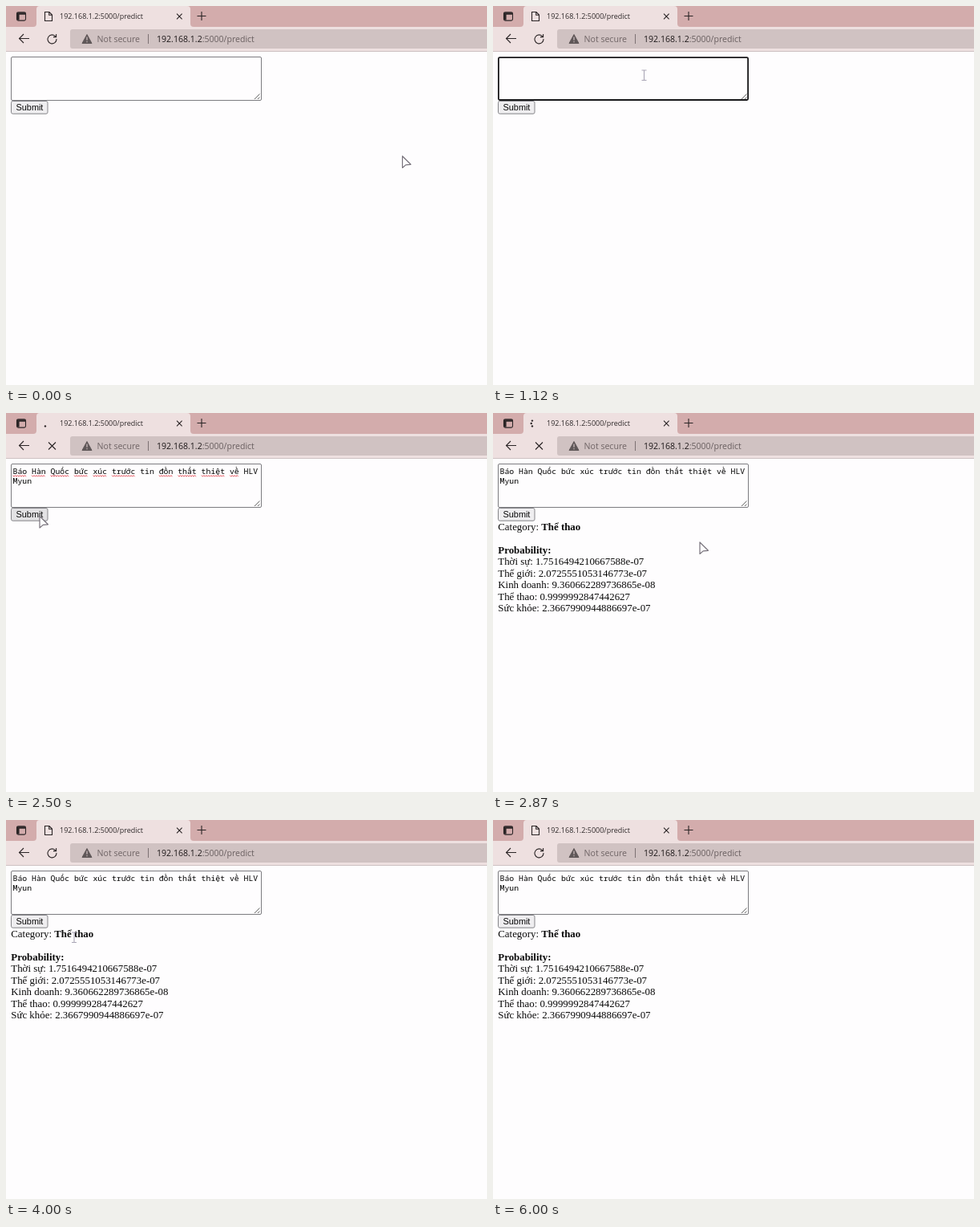
Recreate the animation shown at these times as an HTML page. Size 600 px wide and 472 px high, loop 8000 ms.

```html
<!DOCTYPE html>
<html lang="vi">
<head>
<meta charset="utf-8">
<style>
html, body { margin: 0; width: 100%; height: 100%; overflow: hidden; background: #fefdfe; }
svg { display: block; }
text { white-space: pre; }
.ui { font-family: "Open Sans", "Noto Sans", sans-serif; }
.mono { font: 500 9.8px "Noto Sans Mono", "DejaVu Sans Mono", monospace; fill: #000; }
.serif { font: 12.87px "Liberation Serif", "Times New Roman", serif; fill: #0a0a0a; }
.line { fill: none; stroke: #2b2526; stroke-width: 1.1; }
.bold { font-weight: bold; }
</style>
</head>
<body>
<svg width="600" height="472" viewBox="0 0 600 472">
  <!-- tab strip and toolbar -->
  <rect width="600" height="27" fill="#d3acac"/>
  <rect y="26" width="600" height="30" fill="#eee0e0"/>
  <path d="M34 26Q38 26 38 22V4Q38 0 42 0H226Q230 0 230 4V22Q230 26 234 26Z" fill="#eee0e0"/>
  <rect y="56" width="600" height="1" fill="#cdc1c2"/>
  <rect x="80" y="29" width="530" height="24" rx="3" fill="#d0c2c2"/>

  <rect class="line" x="13.5" y="7.9" width="11" height="10.2" rx="1.8"/>
  <path d="M13.5 8.2H24.5V10.7H16.6V17.5H14Z" fill="#2b2526"/>
  <path class="line" d="M213 9.7L219.6 16.3M219.6 9.7L213 16.3M238.5 12.5H249.5M244 7V18"/>
  <path class="line" d="M29 40.5H16.5M22 35L16.5 40.5L22 46"/>
  <g id="idle" class="line">
    <path d="M48.5 7.5H54L57.5 11V18.5H48.5ZM53.7 7.5V11.3H57.5"/>
    <path d="M62 38.2A5.5 5.5 0 1 0 63 41M62.6 35V38.6H59"/>
  </g>
  <g id="busy">
    <path class="line" d="M53 36.5L62 45.5M62 36.5L53 45.5"/>
    <g id="dots" fill="#2b2526"></g>
  </g>
  <path d="M101 35.5L107 46.5H95Z" fill="#5f5758" stroke="#5f5758" stroke-linejoin="round"/>
  <path d="M101 38.5V42.7M101 44V45.3" stroke="#d0c2c2" stroke-width="1.2"/>
  <path d="M177.5 35V47" stroke="#7d7273"/>
  <g class="ui">
    <text x="67" y="16.2" font-size="9" fill="#2f292a">192.168.1.2:5000/predict</text>
    <text x="113.5" y="45" font-size="10.6" fill="#6f6465">Not secure</text>
    <text x="188" y="45" font-size="10.55" fill="#1f1a1b">192.168.1.2<tspan fill="#695f60">:5000/predict</tspan></text>
  </g>

  <!-- form -->
  <rect id="box" fill="#fefdfe"/>
  <path d="M310 116L316.5 109.5M314 116L316.5 113.5" stroke="#555" stroke-width=".9"/>
  <g id="entry" class="mono">
    <text id="headline" x="8.5" y="76"></text>
    <text x="8.5" y="88.3">Myun</text>
    <path id="waves" fill="none" stroke="#e0404a" stroke-width=".9"/>
  </g>
  <rect id="button" x="6.5" y="118.5" width="45.5" height="15.7" rx="2" stroke="#858589"/>
  <text x="12.5" y="130.2" font-size="10.9" font-family="Liberation Sans, Arial, sans-serif" fill="#0a0a0a">Submit</text>
  <g id="result" class="serif"></g>

  <path id="arrow" d="M0 0V14.5L4.2 10.9L10.4 10.3Z" fill="#fefdfe" stroke="#77727b" stroke-width="1.2" stroke-linejoin="round"/>
  <path id="beam" d="M-3 -6H3M0 -6V6.5M-3 6.5H3" fill="none" stroke="#aaa6b6" stroke-width="1.1"/>
</svg>
<script>
const $ = id => document.getElementById(id);
const show = (id, on) => $(id).setAttribute('display', on ? 'inline' : 'none');
const set = (id, attrs) => Object.entries(attrs).forEach(([k, v]) => $(id).setAttribute(k, v));

const headline = 'Báo Hàn Quốc bức xúc trước tin đồn thất thiệt về HLV';
$('headline').textContent = headline;

// Spelling marks under every word the checker does not know
const charWidth = 5.885;
let waves = '', column = 0;
for (const word of headline.split(' ')) {
  if (!['tin', 'HLV'].includes(word)) {
    const start = 8.5 + column * charWidth, end = start + word.length * charWidth;
    for (let x = start, i = 0; x <= end; x += 1.5, i++)
      waves += `${i ? 'L' : 'M'}${x} ${i % 2 ? 79.2 : 77.6}`;
  }
  column += word.length + 1;
}
set('waves', { d: waves });

const rows = [
  'Category: <tspan class="bold">Thể thao</tspan>', '',
  '<tspan class="bold">Probability:</tspan>',
  'Thời sự: 1.7516494210667588e-07',
  'Thế giới: 2.0725551053146773e-07',
  'Kinh doanh: 9.360662289736865e-08',
  'Thể thao: 0.9999992847442627',
  'Sức khỏe: 2.3667990944886697e-07'
];
$('result').innerHTML = rows.map((row, i) =>
  `<text x="6.3" y="${146 + i * 14.42}">${row}</text>`).join('');

$('dots').innerHTML = [140, 180, 220].map(deg => {
  const a = deg * Math.PI / 180;
  return `<circle cx="${53 + 5.3 * Math.cos(a)}" cy="${13 + 5.3 * Math.sin(a)}" r="1.2"/>`;
}).join('');

// Pointer stops: time, x, y, shape
const stops = [
  [0, 494.5, 187, 'arrow'], [120, 460, 172, 'arrow'], [245, 365, 132, 'arrow'],
  [370, 245, 97, 'beam'], [500, 195, 87, 'beam'], [620, 188.5, 86, 'beam'],
  [1500, 165, 95, 'beam'], [1620, 88, 121, 'arrow'], [1750, 64.5, 124.3, 'arrow'],
  [1870, 54, 126, 'arrow'], [2000, 45, 128, 'arrow'], [2120, 42, 128.5, 'arrow'],
  [2750, 110, 140, 'arrow'], [2870, 258, 161, 'arrow'], [3000, 320, 218, 'arrow'],
  [3120, 333, 233, 'arrow'], [3500, 310, 222, 'arrow'], [3620, 235, 195, 'arrow'],
  [3750, 145, 165, 'arrow'], [3870, 95, 149, 'beam'], [4000, 85, 146, 'beam'],
  [4250, 120, 160, 'arrow'], [4370, 230, 197, 'arrow'], [4500, 303, 216, 'arrow'],
  [4750, 410, 180, 'arrow'], [4870, 577, 110, 'arrow'], [5000, 0, 0, 'none']
];

function draw() {
  const t = performance.now() % 8000;
  const between = (from, to) => t >= from && t < to;

  const focus = between(500, 2370);
  set('box', focus
    ? { x: 6.9, y: 64.2, width: 311.2, height: 52.8, rx: 1.5, stroke: '#18181a', 'stroke-width': 1.8 }
    : { x: 6.5, y: 63.5, width: 312, height: 54, rx: 1.5, stroke: '#7c7c80', 'stroke-width': 1 });
  set('button', { fill: between(2000, 2750) ? '#e3e2e4' : '#efeef0' });
  show('entry', t >= 1370);
  show('waves', t < 2750);
  show('result', t >= 2750);

  const loading = between(2500, 3000);
  show('idle', !loading);
  show('busy', loading);
  [...$('dots').children].forEach((dot, i) =>
    dot.setAttribute('opacity', t >= 2500 + i * 120 ? 1 : 0));

  const [, x, y, shape] = stops.filter(stop => stop[0] <= t).pop();
  for (const id of ['arrow', 'beam']) {
    show(id, id === shape);
    set(id, { transform: `translate(${x} ${y})` });
  }
  requestAnimationFrame(draw);
}
draw();
</script>
</body>
</html>
```
